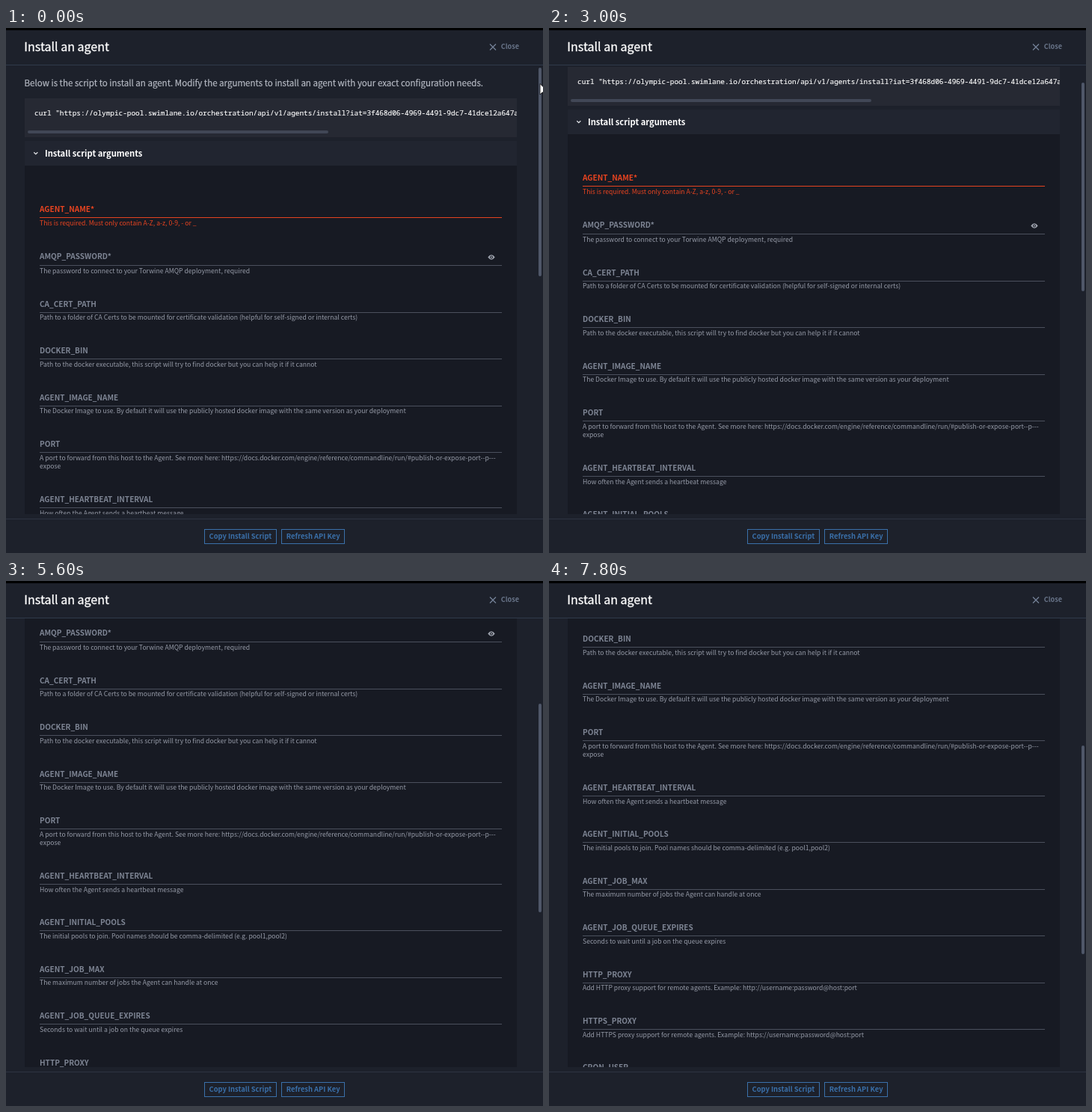
Animation of 718 by 702 pixels, one loop 8000 ms. Source, as an HTML page:

```html
<!DOCTYPE html>
<html lang="en">
<head>
<meta charset="utf-8">
<title>Install an agent</title>
<style>
html, body { margin: 0; width: 100%; height: 100%; overflow: hidden; background: #1d212b; }
svg { display: block; }
text { font-family: "Noto Sans CJK JP", "Noto Sans CJK SC", "Noto Sans CJK", "Open Sans", sans-serif; white-space: pre; }
.title { font-size: 16px; fill: #fff; stroke: #fff; stroke-width: .3px; }
.intro { font-size: 11.52px; fill: #b4b8c2; stroke: #b4b8c2; stroke-width: .2px; }
.code { font: 500 9.39px "Noto Sans Mono", "DejaVu Sans Mono", monospace; fill: #fff; stroke: #fff; stroke-width: .15px; }
.head { font-size: 11.2px; font-weight: 700; fill: #fff; }
.label { font-size: 10.05px; font-weight: 700; fill: #7e8594; }
.help { font-size: 8.63px; fill: #969ba8; }
.close { font-size: 9.15px; font-weight: 700; fill: #69758a; }
.button { font-size: 9.37px; font-weight: 700; fill: #3a70aa; }
.error { fill: #ea4420; }
</style>
</head>
<body>
<svg width="718" height="702" viewBox="0 0 718 702">
  <clipPath id="view"><rect y="50" width="718" height="600"/></clipPath>
  <clipPath id="codeBox"><rect x="25" y="94" width="658" height="52"/></clipPath>
  <rect width="718" height="702" fill="#1d212b"/>

  <g clip-path="url(#view)">
    <g id="page">
      <text class="intro" x="24.5" y="78">Below is the script to install an agent. Modify the arguments to install an agent with your exact configuration needs.</text>
      <rect x="25" y="94" width="658" height="52" fill="#262933"/>
      <text class="code" x="38" y="117" clip-path="url(#codeBox)">curl "https://olympic-pool.swimlane.io/orchestration/api/v1/agents/install?iat=3f468d06-4969-4491-9dc7-41dce12a647a</text>
      <rect x="29" y="137" width="402" height="4" rx="2" fill="#414756"/>
      <rect x="25" y="151" width="658" height="33" fill="#212530"/>
      <path d="M37.3 166.2l2.5 2.4 2.5-2.4" fill="none" stroke="#e4e6ea" stroke-width="1.3"/>
      <text class="head" x="52" y="172">Install script arguments</text>
      <rect x="25" y="184" width="658" height="1000" fill="#171a23"/>
      <g id="fields"></g>
      <path d="M644.3 306.5q4.7-6.4 9.4 0q-4.7 6.4-9.4 0z" fill="#a0a5b0"/>
      <circle cx="649" cy="306.5" r="1.9" fill="#171a23"/>
      <circle cx="649" cy="306.5" r="1" fill="#a0a5b0"/>
    </g>
  </g>

  <rect width="718" height="3" fill="#000"/>
  <rect y="49" width="718" height="1" fill="#303a4b"/>
  <text class="title" x="24.3" y="31">Install an agent</text>
  <path d="M647 21.5l8 8m0-8l-8 8" stroke="#76839a" stroke-width="1.2"/>
  <text class="close" x="661.7" y="28.4">Close</text>

  <rect y="656" width="718" height="1" fill="#2d3442"/>
  <g fill="none" stroke="#3a70aa">
    <rect x="265.5" y="670.5" width="96" height="19"/>
    <rect x="368.5" y="670.5" width="84" height="19"/>
  </g>
  <text class="button" x="271.5" y="683.3">Copy Install Script</text>
  <text class="button" x="374.8" y="683.3">Refresh API Key</text>

  <rect id="thumb" x="712" y="53" width="4" height="279" rx="2" fill="#4f5769"/>
  <path id="cursor" d="M0 0v14.5l3.4-3.2 2.3 5.3 2.4-1-2.3-5.2h4.7z" fill="#fff" stroke="#000" stroke-width=".8"/>
</svg>
<script>
const $ = id => document.getElementById(id);

// label centre, underline, help centre, label, help lines
const fields = [
  [242, 253, 261, "AGENT_NAME*", "This is required. Must only contain A-Z, a-z, 0-9, - or _"],
  [305, 317, 324.5, "AMQP_PASSWORD*", "The password to connect to your Torwine AMQP deployment, required"],
  [369, 380, 387, "CA_CERT_PATH", "Path to a folder of CA Certs to be mounted for certificate validation (helpful for self-signed or internal certs)"],
  [431, 442, 450, "DOCKER_BIN", "Path to the docker executable, this script will try to find docker but you can help it if it cannot"],
  [494, 505, 512, "AGENT_IMAGE_NAME", "The Docker Image to use. By default it will use the publicly hosted docker image with the same version as your deployment"],
  [556, 567, 575, "PORT", "A port to forward from this host to the Agent. See more here: https://docs.docker.com/engine/reference/commandline/run/#publish-or-expose-port--p---", "expose"],
  [630, 641, 648.5, "AGENT_HEARTBEAT_INTERVAL", "How often the Agent sends a heartbeat message"],
  [692, 703, 711, "AGENT_INITIAL_POOLS", "The initial pools to join. Pool names should be comma-delimited (e.g. pool1,pool2)"],
  [755, 766, 773, "AGENT_JOB_MAX", "The maximum number of jobs the Agent can handle at once"],
  [817, 828, 836, "AGENT_JOB_QUEUE_EXPIRES", "Seconds to wait until a job on the queue expires"],
  [880, 891, 898, "HTTP_PROXY", "Add HTTP proxy support for remote agents. Example: http://username:password@host:port"],
  [942, 953, 961, "HTTPS_PROXY", "Add HTTPS proxy support for remote agents. Example: https://username:password@host:port"],
  [1004, 1015, 1023, "CRON_USER", ""]
];

const text = (style, y, words) => `<text class="${style}" x="45" y="${y}">${words}</text>`;

$("fields").innerHTML = fields.map(([labelY, lineY, helpY, label, ...help], i) => {
  const error = i ? "" : " error";
  return text("label" + error, labelY + 4, label) +
    `<rect x="45" y="${lineY}" width="618" height="1" fill="${i ? "#4b505d" : "#e4421f"}"/>` +
    help.map((line, n) => text("help" + error, helpY + 3 + n * 11, line)).join("");
}).join("");

const scrollKeys = [[0, 0], [1400, 0], [2200, 24], [3000, 42], [3400, 62], [4200, 118], [5600, 236],
  [6000, 260], [6600, 280], [6800, 280], [7000, 291], [7800, 354]];
const cursorKeys = [[0, 714], [200, 714], [400, 715.5], [2400, 715.5], [2800, 719], [7800, 719]];

function at(keys, t) {
  const i = Math.max(1, keys.findIndex(k => k[0] >= t));
  const [t0, a] = keys[i - 1], [t1, b] = keys[i];
  return a + (b - a) * (t - t0) / (t1 - t0);
}

function draw(now) {
  const t = Math.floor(now % 8000 / 200) * 200; // the screen refreshes five times a second
  const scroll = Math.round(at(scrollKeys, t));
  const drag = Math.round(scroll * 0.472);
  $("page").setAttribute("transform", `translate(0 ${-scroll})`);
  $("thumb").setAttribute("y", 53 + drag);
  $("cursor").setAttribute("transform", `translate(${at(cursorKeys, t)} ${74.5 + drag})`);
  requestAnimationFrame(draw);
}
draw(performance.now());
</script>
</body>
</html>
```
